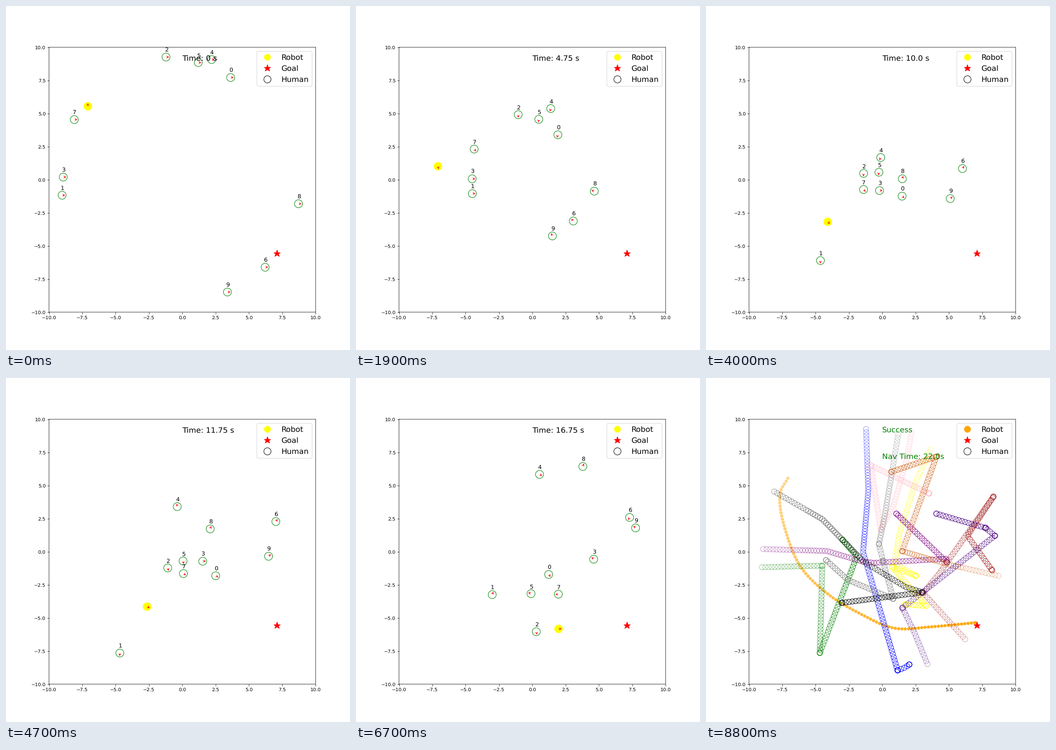
These frames come from a looping animation (748x748 px, 8900 ms). A matplotlib script:

```python
import numpy as np
import matplotlib.pyplot as plt
from matplotlib.animation import FuncAnimation
from matplotlib.collections import PatchCollection
from matplotlib.colors import to_rgba
from matplotlib.lines import Line2D
from matplotlib.patches import ArrowStyle, Circle, FancyArrowPatch

SIZE, DPI = 748, 74.8
STEPS, DT = 89, 0.25
PACE = 7.22                 # pixels walked per step
MEET, PART = 11, 40         # steps between which the crowd is dense
RADIUS = 0.3
GOAL = (7.09, -5.56)

plt.rcParams["font.family"] = "DejaVu Sans"
plt.rcParams["text.hinting"] = "no_hinting"
fig = plt.figure(figsize=(SIZE / DPI, SIZE / DPI), dpi=DPI, facecolor="white")
ax = fig.add_subplot()
ax.set_xlim(-10, 10)
ax.set_ylim(-10, 10)
for spine in ax.spines.values():
    spine.set_snap(False)


def smooth(points, samples=400):
    """Cubic curve through evenly timed points."""
    p = np.array(points, float)
    m = np.gradient(p, axis=0)
    u = np.linspace(0, len(p) - 1, samples)
    i = np.minimum(u.astype(int), len(p) - 2)
    f = (u - i)[:, None]
    return ((1 + 2 * f) * (1 - f) ** 2 * p[i] + f * (1 - f) ** 2 * m[i]
            + f ** 2 * (3 - 2 * f) * p[i + 1] + f ** 2 * (f - 1) * m[i + 1])


def walk(plan, early=1, crowd=1):
    """Steady walk along pixel points; a bare number is a rest in steps."""
    spots, marks = [plan[0]], [0]
    for item in plan[1:]:
        if np.ndim(item) == 0:
            spots.append(spots[-1])
            marks.append(marks[-1] + item * PACE)
        else:
            gap = np.hypot(*np.subtract(item, spots[-1]))
            spots.append(item)
            marks.append(marks[-1] + gap)
    k = np.arange(STEPS)
    speed = np.where(k <= MEET, early, np.where(k <= PART, crowd, 1)) * PACE
    speed[0] = 0
    px, py = (np.interp(np.cumsum(speed), marks, c) / SIZE for c in zip(*spots))
    return np.column_stack([(px - 0.125) / 0.775 * 20 - 10,
                            (0.89 - py) / 0.77 * 20 - 10])


def headings(path, first):
    """Direction of the last move, kept while resting."""
    angles = [first]
    for dx, dy in np.diff(path, axis=0):
        moving = np.hypot(dx, dy) > 1e-6
        angles.append(np.arctan2(dy, dx) if moving else angles[-1])
    return angles


class Agent:
    def __init__(self, color, path, name=None):
        self.path, self.name = path, name
        robot = name is None
        self.angle = headings(path, np.pi / 2 if robot else 0)
        look = dict(color="yellow") if robot else dict(fill=False, edgecolor="green")
        self.body = ax.add_patch(Circle(path[0], RADIUS, **look))
        self.arrow = ax.add_patch(FancyArrowPatch(
            (0, 0), (1, 0), color="red",
            arrowstyle=ArrowStyle("->", head_length=4, head_width=2)))
        self.label = ax.text(0, 0, name or "", fontsize=12)
        shades = [to_rgba(color, a) for a in np.linspace(0.4, 1, STEPS)]
        dots = [Circle(p, 0.1 if robot else 0.2) for p in path]
        self.trail = ax.add_collection(PatchCollection(
            dots, edgecolors=shades, facecolors=shades if robot else "none",
            linewidths=1, zorder=1), autolim=False)

    def show(self, k, done):
        self.trail.set_visible(done)
        for part in (self.body, self.arrow, self.label):
            part.set_visible(not done)
        x, y = self.path[k]
        a = self.angle[k]
        self.body.center = (x, y)
        self.arrow.set_positions(
            (x, y), (x + RADIUS * np.cos(a), y + RADIUS * np.sin(a)))
        self.label.set_position((x - 0.11, y + 0.4))


agents = [Agent("orange", walk(smooth([
    (178, 218), (160.5, 255), (169.5, 320), (203.5, 407), (263.5, 468.5),
    (338, 514), (410, 544), (490, 541), (586, 532)])))]


def human(color, plan, early=1, crowd=1):
    agents.append(Agent(color, walk(plan, early, crowd), str(len(agents) - 1)))


human("yellow", [(488.5, 155.5), (455.5, 227.5), (420, 340), (411, 400),
                 (424.5, 412.5), (456, 430), 7.3, (405, 411), 4.5, (478, 495.5),
                 1.5, (432, 492)], crowd=0.95)
human("green", [(122, 411.5), (253, 408), 1.3, (247.5, 598), 2, (328, 388),
                (297, 352)], early=0.965)
human("blue", [(348, 111), (353, 245), (341.5, 378), (416.5, 636), 1.7,
               (434, 629), (442, 623)], early=0.965, crowd=0.845)
human("purple", [(124.5, 372), (262, 376), (340, 399), (365, 402), (525, 393),
                 (524, 401), 4, (414, 295)], crowd=0.845)
human("pink", [(447, 116.5), (436.5, 177.5), (408.5, 275), (380, 329.5), 1.5,
               (358.5, 190), 1.2, (485, 251)], early=0.77, crowd=0.833)
human("gray", [(418, 123), (388.5, 300.5), (376, 361.5), 1.5, (385, 398), 3,
               (407, 480), 3, (308.5, 439), (261, 396)], early=0.965, crowd=0.84)
human("brown", [(563.5, 568), (472.5, 467.5), 1.5, (508, 424), (625, 258), 3.3,
                (568.5, 343), (622, 418)])
human("black", [(148.5, 247), (253, 307), (343, 399.5), (435, 455), (471, 466),
                2.5, (295, 489)], crowd=0.81)
human("chocolate", [(636, 430), (530, 406), (426.5, 376.5), 1.8, (501, 171), 2.5,
                    (403, 204)], crowd=0.72)
human("indigo", [(481.5, 622), (451, 548.5), (427, 500), 3.2, (628, 343), 5,
                 (608, 326), 5.9, (501, 295)])


def marker(shape, face, edge, xy=(0, 0)):
    return Line2D([xy[0]], [xy[1]], linestyle="none", marker=shape, markersize=15,
                  markerfacecolor=face, markeredgecolor=edge)


ax.add_line(marker("*", "red", "red", GOAL))
legend = ax.legend(
    [marker("o", "yellow", "white"), marker("*", "red", "red"),
     marker("o", "none", "black")],
    ["Robot", "Goal", "Human"], fontsize=16, loc="upper right")
clock = ax.text(0, 9, "", fontsize=16)
result = ax.text(0, 7, "Nav Time: 22.0s", fontsize=16, color="green")


def update(k):
    done = k == STEPS - 1
    for agent in agents:
        agent.show(k, done)
    legend.legend_handles[0].set_markerfacecolor("orange" if done else "yellow")
    clock.set_text("Success" if done else f"Time: {k * DT if k else 0} s")
    clock.set_color("green" if done else "black")
    result.set_visible(done)
    return []


anim = FuncAnimation(fig, update, frames=STEPS, init_func=lambda: update(0),
                     interval=100, repeat=True, repeat_delay=0, blit=False)
plt.show()
```
